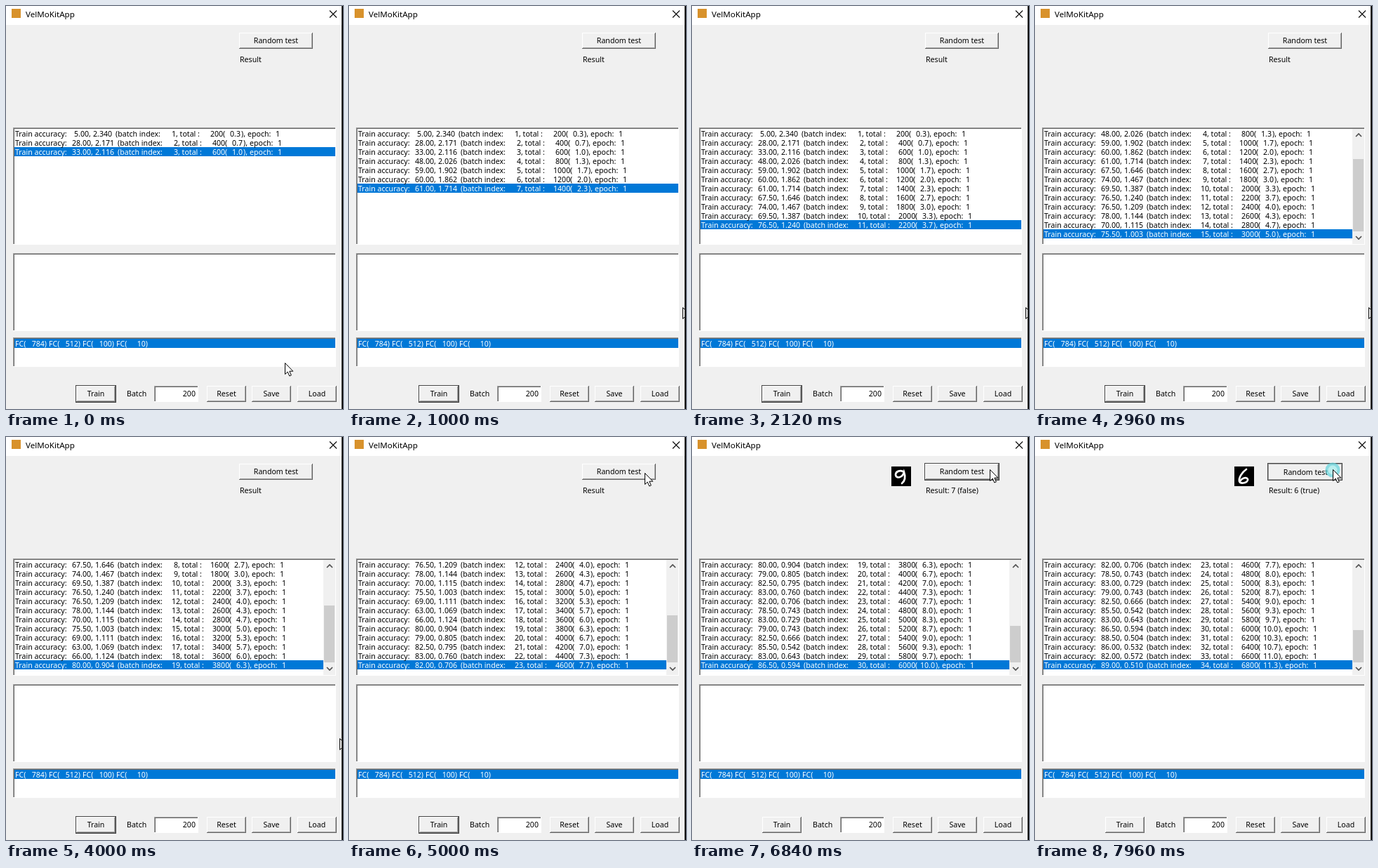
Write an HTML page that moves like this. It is 480x574 px and loops after 8000 ms.

```html
<!DOCTYPE html>
<html lang="en">
<head>
<meta charset="utf-8">
<title>VelMoKitApp</title>
<style>
html, body { margin: 0; width: 100%; height: 100%; overflow: hidden; background: #f0f0f0; }
svg { display: block; width: 480px; height: 574px; }
text { font: 10.6px "Noto Sans", "Open Sans", sans-serif; fill: #000; }
rect { shape-rendering: crispEdges; }
</style>
</head>
<body>
<svg id="stage" viewBox="0 0 480 574" xmlns="http://www.w3.org/2000/svg"></svg>
<script>
const LOOP = 8000, ROWS = 12, ROW_H = 13, TOP = 175;
const FACE = '#f0f0f0', PAPER = '#fff', BLUE = '#0078d7', INK = '#111';
const stage = document.getElementById('stage');

const accuracy = [5, 28, 33, 48, 59, 60, 61, 67.5, 74, 69.5, 76.5, 76.5, 78, 70, 75.5, 69, 63,
  66, 80, 79, 82.5, 83, 82, 78.5, 83, 79, 82.5, 85.5, 83, 86.5, 88.5, 86, 82, 89];
const loss = [2.34, 2.171, 2.116, 2.026, 1.902, 1.862, 1.714, 1.646, 1.467, 1.387, 1.24, 1.209,
  1.144, 1.115, 1.003, 1.111, 1.069, 1.124, .904, .805, .795, .76, .706, .743, .729, .743, .666,
  .542, .643, .594, .504, .532, .572, .51];

function add(parent, tag, attrs = {}, content = '') {
  const el = document.createElementNS('http://www.w3.org/2000/svg', tag);
  set(el, attrs);
  el.textContent = content;
  return parent.appendChild(el);
}
function set(el, attrs) {
  for (const key in attrs) el.setAttribute(key, attrs[key]);
}
const box = (x, y, width, height, fill, parent = stage) =>
  add(parent, 'rect', { x, y, width, height, fill });
const label = (x, y, s, attrs = {}, parent = stage) => add(parent, 'text', { x, y, ...attrs }, s);
const show = (el, on) => el.setAttribute('visibility', on ? 'visible' : 'hidden');

function sunken(x, y, w, h) {
  box(x, y, w, h, '#fff');
  box(x, y, w - 1, h - 1, '#a0a0a0');
  box(x + 1, y + 1, w - 2, h - 2, '#696969');
  box(x + 2, y + 2, w - 3, h - 3, PAPER);
}

function button(x, y, w, h, caption) {
  const frame = box(x - 1, y - 1, w + 2, h + 2, '#444');
  box(x, y, w, h, '#696969');
  box(x, y, w - 1, h - 1, '#fff');
  box(x + 1, y + 1, w - 2, h - 2, '#a0a0a0');
  box(x + 1, y + 1, w - 3, h - 3, FACE);
  const pressed = add(stage, 'rect', { x: x + .5, y: y + .5, width: w - 1, height: h - 1,
    fill: FACE, stroke: '#a0a0a0' });
  const text = label(x + w / 2, y + h / 2 + 3.5, caption, { 'text-anchor': 'middle' });
  show(pressed, false);
  show(frame, false);
  return {
    focus: on => show(frame, on),
    press(on) {
      show(pressed, on);
      text.setAttribute('transform', on ? 'translate(1 1)' : '');
    }
  };
}

// window
box(0, 0, 480, 574, FACE);
box(0, 0, 480, 27, '#fff');
box(8, 4, 13, 13, '#d8922c');
label(28, 15.5, 'VelMoKitApp', { style: 'font-size:11.6px' });
add(stage, 'path', { d: 'M461 6.5l10 10m0-10l-10 10', stroke: INK, 'stroke-width': 1.2 });

// controls
const testBtn = button(332, 38, 105, 23, 'Random test');
const trainBtn = button(100, 541, 56, 23, 'Train');
button(286, 541, 56, 23, 'Reset');
button(350, 541, 56, 23, 'Save');
button(415, 541, 56, 23, 'Load');
label(172, 556, 'Batch');
sunken(211, 541, 63, 23);
label(270, 556, '200', { 'text-anchor': 'end' });
const result = label(333, 80, 'Result');

// lists
sunken(10, 173, 460, 167);
sunken(10, 352, 460, 111);
sunken(10, 472, 460, 42);
box(12, 474, 457, 13, BLUE);
['784', '512', '100', '10'].forEach((n, i) => {
  const x = 13 + i * 48;
  label(x, 485, 'FC(', { style: 'fill:#fff' });
  label(x + 45, 485, n + ')', { style: 'fill:#fff', 'text-anchor': 'end' });
});

const mark = box(12, TOP, 457, ROW_H, BLUE);
const rows = Array.from({ length: ROWS }, (_, i) =>
  add(stage, 'g', { transform: `translate(0 ${TOP + i * ROW_H + 11})` }));

const bar = add(stage, 'g');
box(452, 175, 17, 164, FACE, bar);
const thumb = box(453, 192, 15, 129, '#cdcdcd', bar);
add(bar, 'path', { d: 'M457 186l4-4 4 4M457 328l4 4 4-4', fill: 'none', stroke: '#505050',
  'stroke-width': 1.7 });

// Blanks are 3 px and digits 6 px wide, so each extra digit moves the rest by 3 px.
function fillRow(row, k, selected) {
  const acc = accuracy[k - 1], pct = k / 3;
  const a = acc < 10 ? -3 : 0;
  const b = a + (k > 9 ? 3 : 0);
  const c = b + (k > 4 ? 3 : 0);
  const d = c + (k > 29 ? 3 : 0);
  row.textContent = '';
  const style = selected ? 'fill:#fff' : '';
  [
    [13, 'Train accuracy:'],
    [94 - a, acc.toFixed(2) + ','],
    [127 + a, loss[k - 1].toFixed(3)],
    [159 + a, '(batch index:'],
    [239 + 2 * a - b, k],
    [245 + b, ', total :'],
    [294 + 2 * b - c, k * 200],
    [312 + c, '('],
    [322 + 2 * c - d, pct.toFixed(1)],
    [338 + d, '),'],
    [347 + d, 'epoch:'],
    [387 + d, '1']
  ].forEach(([x, s]) => label(x, 0, s, { style }, row));
}

let drawn = 0;
function drawLog(count) {
  if (count === drawn) return;
  drawn = count;
  const first = Math.max(0, count - ROWS), last = Math.min(count, ROWS) - 1;
  rows.forEach((row, i) => {
    if (i <= last) fillRow(row, first + i + 1, i === last);
    else row.textContent = '';
  });
  set(mark, { y: TOP + last * ROW_H, width: first ? 440 : 457 });
  show(bar, first > 0);
  const size = 129 * Math.min(1, ROWS / count);
  set(thumb, { y: 321 - size, height: size });
}

// sample digit
const sample = add(stage, 'g');
box(284, 42, 28, 28, '#000', sample);
const digit = add(sample, 'path', { fill: 'none', stroke: '#fff', 'stroke-width': 2.7,
  'stroke-linecap': 'round' });
const NINE = 'M302 50C297 46 290 49 290 54C291 60 300 58 302 50C304 56 304 62 299 66';
const SIX = 'M301 46C295 50 290 58 291 63C293 68 304 65 303 60C301 56 294 59 292 63';

const ripple = add(stage, 'g');
const glow = add(ripple, 'circle', { fill: '#a6eeee', stroke: '#62d5dd', 'stroke-width': 4 });
const cursor = add(stage, 'path', { d: 'M.5 .5V16.5L4.2 13.1L6.8 19L9.3 17.9L6.8 12.2H11.8Z',
  fill: '#fff', stroke: '#000' });
box(478, 0, 2, 574, '#111');

const RIPPLE = 480, PRESS = 160;
const clicks = [5160, 6000, 7040, 7840];

const smooth = u => u * u * (3 - 2 * u);
const slowDown = u => 1 - (1 - u) ** 3;
// The pointer is already under way when the loop starts.
const moves = [
  { start: 0, end: 440, from: [396, 509], to: [475, 429], ease: slowDown },
  { start: 4200, end: 4840, from: [475, 429], to: [421, 51], ease: smooth },
  { start: 5480, end: 5640, from: [421, 51], to: [424, 46], ease: smooth }
];

function pointer(t) {
  const { start, end, from, to, ease } = moves.filter(m => t >= m.start).pop();
  const e = ease(Math.min(1, (t - start) / (end - start)));
  return from.map((v, i) => Math.round(v + (to[i] - v) * e));
}

function batches(t) {
  const steps = t < 5673 ? (t + 8) / 247 : 23 + (t - 5673) / 268.5;
  return Math.min(34, 3 + Math.floor(steps));
}

function draw(t) {
  drawLog(batches(t));

  const [x, y] = pointer(t);
  cursor.setAttribute('transform', `translate(${x} ${y})`);

  const age = Math.min(...clicks.map(c => t < c ? Infinity : t - c));
  const lit = age < RIPPLE;
  show(ripple, lit);
  if (lit) {
    const u = age / RIPPLE;
    set(glow, { cx: x, cy: y + 1, r: 5 + 14 * u });
    ripple.setAttribute('opacity', .95 * (1 - u));
  }

  const focused = t >= clicks[0];
  trainBtn.focus(!focused);
  testBtn.focus(focused);
  testBtn.press(age < PRESS);

  const tested = t >= clicks[0] + PRESS, six = t >= clicks[2] + PRESS;
  show(sample, tested);
  digit.setAttribute('d', six ? SIX : NINE);
  result.textContent = !tested ? 'Result' : six ? 'Result: 6 (true)' : 'Result: 7 (false)';
}

function tick() {
  draw(performance.now() % LOOP);
  requestAnimationFrame(tick);
}
tick();
</script>
</body>
</html>
```
